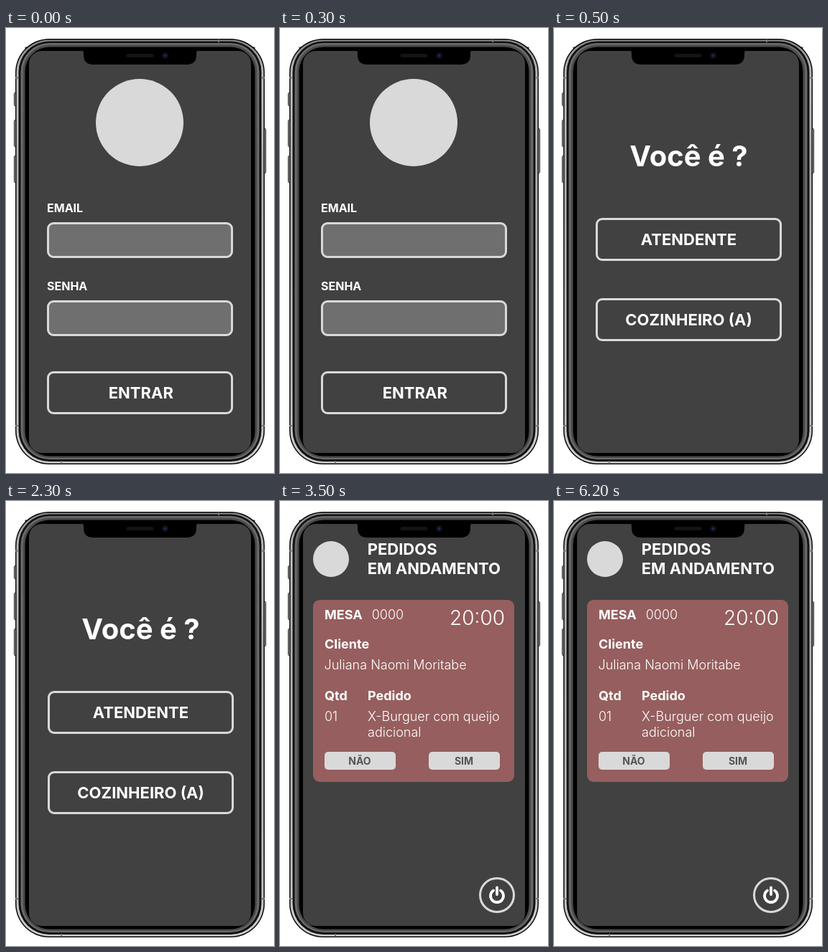
An HTML page for the animation above (8000 ms loop, 373x621 px).

```html
<!DOCTYPE html>
<html lang="pt-BR">
<head>
<meta charset="utf-8">
<title>Pedidos</title>
<style>
  html, body { margin: 0; width: 100%; height: 100%; overflow: hidden; background: #fff; }
  svg { display: block; width: 373px; height: 621px; font-family: Inter, sans-serif; fill: #fff; }
  text { font-weight: 700; }
  .book { font-weight: 350; }
  .light { font-weight: 300; }
  .mid { text-anchor: middle; }
  .s14 { font-size: 14px; fill: #555; }
  .s16 { font-size: 16px; }
  .s18 { font-size: 18px; }
  .s22 { font-size: 22px; }
  .box { fill: none; stroke: #d9d9d9; stroke-width: 3; }
  .field { fill: #6f6f6f; }
  .pale { fill: #d9d9d9; }

  .screen { visibility: hidden; animation: 8s step-end infinite; }
  .login { animation-name: login; }
  .role { animation-name: role; }
  .orders { animation-name: orders; }
  @keyframes login { 0% { visibility: visible; } 6.25%, 100% { visibility: hidden; } }
  @keyframes role {
    0% { visibility: hidden; } 6.25% { visibility: visible; } 43.75%, 100% { visibility: hidden; }
  }
  @keyframes orders { 0% { visibility: hidden; } 43.75%, 100% { visibility: visible; } }
</style>
</head>
<body>
<svg viewBox="0 0 373 621">
  <defs>
    <linearGradient id="rim" x2="0" y2="1">
      <stop offset="0" stop-color="#888"/>
      <stop offset=".1" stop-color="#c4c4c4"/>
      <stop offset=".3" stop-color="#b0b0b0"/>
      <stop offset=".8" stop-color="#bbb"/>
      <stop offset="1" stop-color="#ccc"/>
    </linearGradient>
  </defs>

  <!-- side buttons -->
  <g fill="#bbb" stroke="#111">
    <rect x="11.5" y="90.5" width="4" height="18" rx="1"/>
    <rect x="11.5" y="128.5" width="4" height="37" rx="1"/>
    <rect x="11.5" y="178.5" width="4" height="37" rx="1"/>
    <rect x="357.5" y="140.5" width="4" height="62" rx="1"/>
  </g>

  <!-- body, from the rim inwards -->
  <rect x="26.500" y="26.500" width="320" height="200" fill="#333"/>
  <rect x="13" y="15" width="347" height="594" rx="47" fill="#080808"/>
  <rect x="14.500" y="16.500" width="344" height="591" rx="45.500" fill="url(#rim)"/>
  <rect x="17.500" y="18.500" width="338" height="586.500" rx="43" fill="#111"/>
  <rect x="20.500" y="21" width="332" height="581" rx="40" fill="#6a6c6d"/>
  <rect x="23.500" y="23.500" width="326" height="576.500" rx="37" fill="#4a4b4c"/>
  <rect x="26.500" y="26.500" width="320" height="571" rx="34" fill="#000"/>
  <path d="M296 16v4M77 604v4M13 69.500h4M13 555h4M356 69.500h4M356 555h4" stroke="#777" stroke-width="2"/>

  <rect x="32" y="32" width="309" height="561" rx="18" fill="#414141"/>
  <path d="M104 31q4 0 4 4v3q0 13 14 13h129q14 0 14-13v-3q0-4 4-4z" fill="#000"/>
  <rect x="167.500" y="36" width="38" height="5" rx="2.500" fill="#141414"/>
  <circle cx="221.500" cy="38.500" r="4.500" fill="#0c101c"/>
  <circle cx="221.500" cy="38.500" r="2" fill="#1a2555"/>

  <g class="screen login">
    <circle class="pale" cx="186" cy="132" r="61"/>
    <text class="s16" x="57" y="257">EMAIL</text>
    <rect class="box field" x="58.500" y="272.500" width="256" height="47" rx="7.500"/>
    <text class="s16" x="57" y="366">SENHA</text>
    <rect class="box field" x="58.500" y="381.500" width="256" height="47" rx="7.500"/>
    <rect class="box" x="58.500" y="480.500" width="256" height="57" rx="7.500"/>
    <text class="s22 mid" x="187.800" y="517">ENTRAR</text>
  </g>

  <g class="screen role">
    <text class="mid" x="187.500" y="193" font-size="40">Você é ?</text>
    <rect class="box" x="59.500" y="266.500" width="256" height="57" rx="7.500"/>
    <text class="s22 mid" x="187.500" y="303">ATENDENTE</text>
    <rect class="box" x="59.500" y="378.500" width="256" height="57" rx="7.500"/>
    <text class="s22 mid" x="187.500" y="415">COZINHEIRO (A)</text>
  </g>

  <g class="screen orders">
    <circle class="pale" cx="71" cy="81" r="25"/>
    <text class="s22" x="121.700" y="75">PEDIDOS</text>
    <text class="s22" x="121.700" y="102">EM ANDAMENTO</text>
    <rect x="46" y="138" width="280" height="254" rx="9" fill="#965e5e"/>
    <g class="s18">
      <text x="62" y="165">MESA</text>
      <text class="book" x="127.700" y="165">0000</text>
      <text class="light" x="236" y="173" font-size="28">20:00</text>
      <text x="62" y="206">Cliente</text>
      <text class="book" x="61.500" y="235">Juliana Naomi Moritabe</text>
      <text x="62" y="278">Qtd</text>
      <text x="122" y="278">Pedido</text>
      <text class="book" x="62" y="307">01</text>
      <text class="book" x="122" y="307">X-Burguer com queijo</text>
      <text class="book" x="122" y="329">adicional</text>
    </g>
    <rect class="pale" x="62" y="350" width="99" height="25" rx="5"/>
    <text class="s14 mid" x="111" y="368">NÃO</text>
    <rect class="pale" x="207" y="350" width="99" height="25" rx="5"/>
    <text class="s14 mid" x="256" y="368">SIM</text>
    <circle class="box" cx="302" cy="550" r="23.500"/>
    <path d="M297 543.500a9 9 0 1 0 10 0M302 539.500v9.500" fill="none" stroke="#fff" stroke-width="3.800" stroke-linecap="round"/>
  </g>
</svg>
</body>
</html>
```
